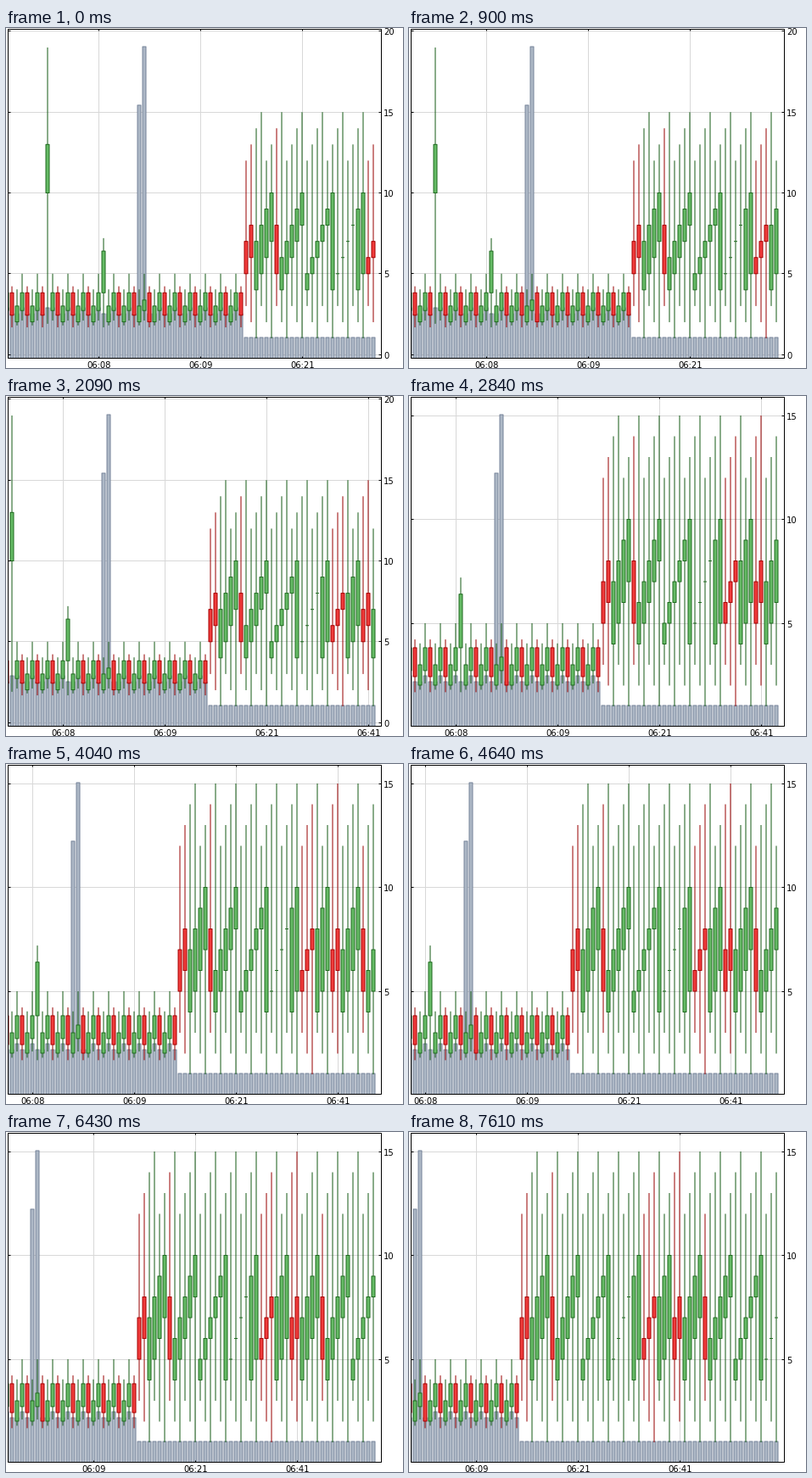
Recreate the animation shown at these times as a matplotlib script. Size 468 by 401 pixels, loop 7.76 s.

```python
import numpy as np
import matplotlib.pyplot as plt
from matplotlib.animation import FuncAnimation
from matplotlib.collections import LineCollection, PolyCollection
from matplotlib.patches import Rectangle

W, H, DPI = 468, 401, 64
PX = 72 / DPI                       # one pixel in points
LOOP, INTERVAL = 7760, 20
LEFT, RIGHT, TOP, BOTTOM = 2.5, 442.5, 1.5, 389.5
PITCH, FIRST_X, VISIBLE = 6, 7, 72
HIGH_Y, LOW_Y = 23, 366             # screen rows of the highest and lowest price

GREEN, GREEN_EDGE, GREEN_WICK = "#66bb66", "#1f6b1f", "#145a14"
RED, RED_EDGE, RED_WICK = "#f03c3c", "#a80000", "#980000"
VOLUME, VOLUME_EDGE, GRID = "#adb8c6", "#76849a", "#d8d8d8"

STEP_TIMES = np.r_[np.arange(300, 1801, 300), 2090, 2540,
                   np.arange(2840, 5841, 300), 6130, 6430, 6730, 7020, 7320, 7610]
TIME_LABELS = {17: "06:08", 37: "06:09", 57: "06:21", 77: "06:41"}
PRICES = (0, 5, 10, 15, 20)
QUIET = ((3.82, 2.43, 4.22, 1.68), (2.02, 3.0, 4.03, 1.8), (2.72, 3.82, 5.0, 2.1))
SPECIAL = {7: (10, 13, 19, 1.9), 18: (3.82, 6.4, 7.2, 1.68),
           26: (2.72, 3.37, 5.0, 2.1), 27: (3.82, 2.02, 4.22, 1.68)}
VOLUME_TOPS = {7: 330, 25: 91, 26: 22}
BUSY_START = 46


def candle(k):
    """Open, close, high and low of candle k."""
    if k in SPECIAL:
        return SPECIAL[k]
    if k < BUSY_START:
        return QUIET[k % 3]
    n = k - BUSY_START
    return 4 + (n + 3) % 5, 5 + n % 6, 12 + n % 4, 3 - n % 3


def volume_top(k):
    if k >= BUSY_START:
        return 365
    return VOLUME_TOPS.get(k, 330 if k % 3 == 2 else 337)


def crisp(v):
    """Centre of the pixel that holds v."""
    return np.floor(v) + 0.5


def box(x0, y0, x1, y1):
    return [(x0, y0), (x1, y0), (x1, y1), (x0, y1)]


fig = plt.figure(figsize=(W / DPI, H / DPI), dpi=DPI, facecolor="white")
ax = fig.add_axes([0, 0, 1, 1])
ax.set_xlim(0, W)
ax.set_ylim(H, 0)
ax.axis("off")


def add_lines(zorder, color="black"):
    return ax.add_collection(LineCollection([], colors=color, linewidths=PX, zorder=zorder,
                                            snap=False, capstyle="butt"))


def add_boxes(zorder, **colors):
    return ax.add_collection(PolyCollection([], linewidths=PX, zorder=zorder,
                                            snap=False, **colors))


grid = add_lines(1, GRID)
volumes = add_boxes(2, facecolors=VOLUME, edgecolors=VOLUME_EDGE)
wicks = add_lines(3)
bodies = add_boxes(4)
ticks = add_lines(7)

font = dict(family="DejaVu Sans", size=10 * PX, color="black", va="baseline")
time_texts = {k: ax.text(0, 401, s, ha="center", zorder=5, **font)
              for k, s in TIME_LABELS.items()}
price_texts = {p: ax.text(445, 0, str(p), ha="left", zorder=5, **font) for p in PRICES}

# Margin mask for whatever scrolls out on the left, then the frame.
ax.add_patch(Rectangle((-1, -1), 3, H + 2, color="white", lw=0, zorder=6, snap=False))
ax.add_patch(Rectangle((LEFT, TOP), RIGHT - LEFT, BOTTOM - TOP,
                       fill=False, ec="black", lw=PX, zorder=7, snap=False))


def update(frame):
    t = frame * INTERVAL + INTERVAL / 2
    step = int(np.searchsorted(STEP_TIMES, t, side="right"))
    shown = range(step - 1, step + VISIBLE)
    data = [candle(k) for k in shown]
    top = max(c[2] for c in data)
    low = min(c[3] for c in data)

    def to_y(price):
        return LOW_Y - (price - low) * (LOW_Y - HIGH_Y) / (top - low)

    def to_x(k):
        return FIRST_X + PITCH * (k - step)

    bars, sticks, boxes, fills, edges, stick_colors = [], [], [], [], [], []
    for k, (start, end, hi, lo) in zip(shown, data):
        x = to_x(k)
        falling = end < start
        bars.append(box(x - 2, volume_top(k), x + 2, BOTTOM))
        sticks.append([(x, to_y(hi)), (x, to_y(lo))])
        boxes.append(box(x - 2, to_y(start), x + 2, to_y(end)))
        fills.append(RED if falling else GREEN)
        edges.append(RED_EDGE if falling else GREEN_EDGE)
        stick_colors.append(RED_WICK if falling else GREEN_WICK)
    volumes.set_verts(bars)
    wicks.set_segments(sticks)
    wicks.set_color(stick_colors)
    bodies.set_verts(boxes)
    bodies.set_facecolor(fills)
    bodies.set_edgecolor(edges)

    lines, marks = [], []
    for p, text in price_texts.items():
        y = crisp(to_y(p))
        visible = TOP < y < BOTTOM
        text.set_visible(visible)
        if visible:
            text.set_y(y + 4.5)
            lines.append([(LEFT, y), (RIGHT, y)])
            marks += [[(LEFT, y), (LEFT + 3, y)], [(RIGHT - 3, y), (RIGHT, y)]]
    for k, text in time_texts.items():
        x = crisp(to_x(k))
        visible = k in shown
        text.set_visible(visible)
        if visible:
            text.set_x(x)
        if visible and x > LEFT:
            lines.append([(x, TOP), (x, BOTTOM)])
            marks += [[(x, TOP), (x, TOP + 2)], [(x, BOTTOM - 2), (x, BOTTOM)]]
    grid.set_segments(lines)
    ticks.set_segments(marks)
    return grid, volumes, wicks, bodies, ticks


anim = FuncAnimation(fig, update, frames=LOOP // INTERVAL, interval=INTERVAL,
                     repeat=True, repeat_delay=0, blit=False)
plt.show()
```
